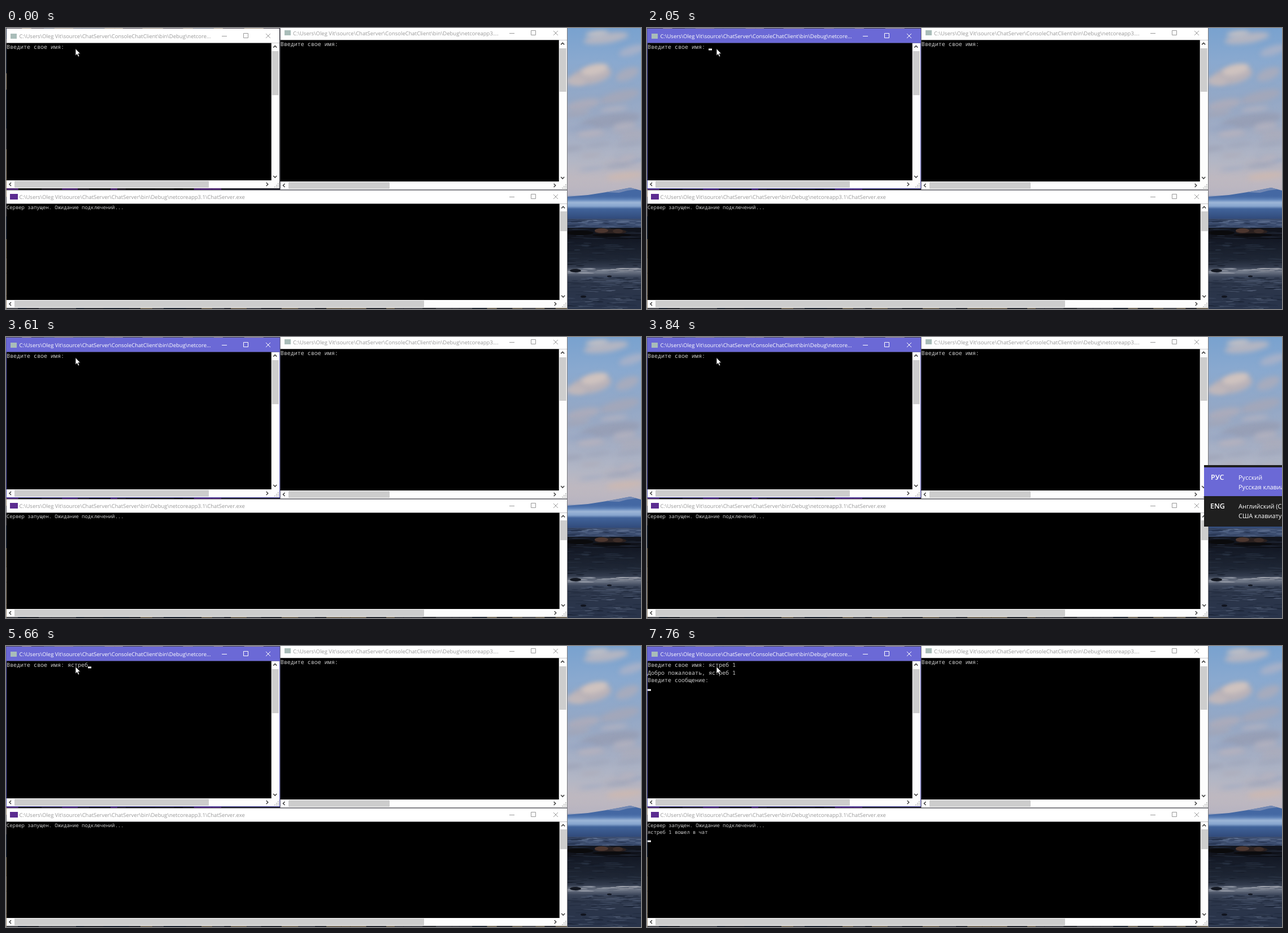
These frames come from a looping animation (1124x498 px, 8000 ms). An HTML page with a canvas:

```html
<!DOCTYPE html>
<html lang="ru">
<head>
<meta charset="utf-8">
<title>Console chat</title>
<style>
  html, body { margin: 0; width: 100%; height: 100%; overflow: hidden; background: #000; }
  canvas, svg { position: absolute; left: 0; top: 0; width: 1124px; height: 498px; }
  text { text-rendering: geometricPrecision; white-space: pre; }
  .ui { font-family: "Open Sans", "Noto Sans", sans-serif; }
  .title { font-size: 9.47px; fill: #999; }
  .mono { font: 10px "Noto Sans Mono", "DejaVu Sans Mono", monospace; fill: #ccc; }
  .small { font-size: 8.89px; }
  .line { fill: none; stroke: #999; stroke-width: 1; }
  .arrow { fill: none; stroke: #444; stroke-width: 1.6; }
  .bar { fill: #fff; }
  .frame { fill: none; stroke: none; }
  .active .bar { fill: #6b69d6; }
  .active .frame { stroke: #5a58b8; }
  .active .title { fill: #fff; }
  .active .line { stroke: #fff; }
  .lang { font-size: 11px; fill: #fff; }
  .code { font-size: 12.5px; font-weight: 600; fill: #fff; }
</style>
</head>
<body>
<canvas id="desk" width="1124" height="498"></canvas>
<svg id="stage" viewBox="0 0 1124 498"></svg>
<script>
const LOOP = 8000;
const CELL = 6;
const PROMPT = 'Введите свое имя: ';
const NAME = 'ястреб 1';
const PATH = 'C:\\Users\\Oleg Vit\\source\\ChatServer\\';

function seeded(seed) {
  return () => {
    seed = (seed * 16807) % 2147483647;
    return seed / 2147483647;
  };
}

// ---- Desktop: seaside backdrop and slivers of windows behind ----
const ctx = document.getElementById('desk').getContext('2d');
const rnd = seeded(4711);
const between = (a, b) => a + (b - a) * rnd();

function box(color, x, y, w, h) {
  ctx.fillStyle = color;
  ctx.fillRect(x, y, w, h);
}

function blob(color, x, y, rx, ry, tilt = 0) {
  ctx.fillStyle = color;
  ctx.beginPath();
  ctx.ellipse(x, y, rx, ry, tilt, 0, Math.PI * 2);
  ctx.fill();
}

function shape(color, points) {
  ctx.fillStyle = color;
  ctx.beginPath();
  points.forEach(([x, y]) => ctx.lineTo(x, y));
  ctx.fill();
}

function fade(y, h, stops) {
  const g = ctx.createLinearGradient(0, y, 0, y + h);
  stops.forEach(s => g.addColorStop(...s));
  box(g, 994, y, 130, h);
}

function ripples(count, colors, top, bottom, maxW) {
  for (let i = 0; i < count; i++) {
    const y = between(top, bottom), w = between(maxW / 4, maxW);
    blob(colors[i % colors.length], between(994, 1124), y, w, between(0.3, 0.9), between(-0.05, 0.05));
  }
}

function drawSky() {
  fade(0, 300, [[0, '#79a2cf'], [0.2, '#8aa9cf'], [0.42, '#94a8c6'], [0.62, '#a3aec5'],
                [0.78, '#b2b6c5'], [0.9, '#c0b9c0'], [1, '#b5b3c2']]);
  ctx.filter = 'blur(4px)';
  blob('#b3b5c2', 1062, 18, 40, 9, -0.15);
  blob('#c5c1c4', 1046, 10, 20, 5, -0.1);
  blob('#a5b0c8', 1108, 40, 24, 8, -0.3);
  blob('#b9b2b8', 1036, 84, 36, 15, -0.2);
  blob('#cfc3bf', 1042, 74, 24, 9, -0.25);
  blob('#bfb7ba', 1008, 94, 18, 8);
  blob('#a6abbd', 1100, 82, 22, 10, -0.4);
  blob('#a2a7ba', 1086, 122, 36, 10, -0.25);
  blob('#aaabbb', 1022, 136, 30, 9, -0.2);
  blob('#979fb6', 1070, 164, 54, 12, -0.15);
  for (let i = 0; i < 24; i++) {
    const color = ['#9ea4b8', '#adacb9', '#98a6c2', '#b6b3bf'][i % 4];
    blob(color, between(994, 1124), between(140, 250), between(12, 30), between(2, 5), -0.12);
  }
  blob('#cbb8b2', 1096, 262, 34, 6, -0.1);
  blob('#bcb7c0', 1024, 274, 40, 6);
  ctx.filter = 'none';
}

function drawShore() {
  shape('#4468a3', [[994, 299], [1030, 296], [1062, 291], [1084, 287], [1105, 283], [1124, 288], [1124, 325], [994, 325]]);
  shape('#7288b3', [[1062, 291], [1084, 287], [1105, 283], [1116, 286], [1100, 288], [1085, 292]]);
  fade(296, 44, [[0, '#4468a300'], [0.18, '#5f83b8'], [0.3, '#9db6d8'], [0.45, '#86a4cd'],
                 [0.56, '#41639a'], [1, '#2f4877']]);
  box('#3c4d6f', 994, 338, 130, 17);
  ripples(36, ['#6b7d9d', '#222f49', '#566889', '#2c3b59'], 339, 354, 24);
  box('#11141d', 994, 354, 130, 24);
  ripples(18, ['#2a3447', '#0a0d14', '#1d2533'], 354, 376, 26);
  blob('#0a0a0c', 1016, 363, 24, 4);
  blob('#2a201f', 1070, 361, 28, 5);
  blob('#4d372f', 1054, 359, 12, 4);
  blob('#3d2d28', 1083, 360, 9, 4);
  blob('#0b0b0e', 1072, 367, 34, 3);

  fade(374, 124, [[0, '#131824'], [0.3, '#1f2736'], [0.4, '#333c4e'], [0.47, '#6b7383'],
                  [0.54, '#3c465a'], [0.65, '#2c364a'], [1, '#28334a']]);
  ripples(60, ['#141a27', '#2a3445', '#1b2332'], 378, 422, 18);
  ripples(22, ['#9ea3af', '#7d8594', '#b0b2ba'], 426, 435, 22);
  ripples(110, ['#1c2537', '#3f4b62', '#232d41', '#4c5870'], 440, 498, 18);
  blob('#141821', 1008, 430, 10, 3);
  blob('#11151f', 1068, 440, 4, 1.5);
  blob('#11151f', 1022, 476, 5, 2);
}

function slivers(x, y, w, h, colors, step) {
  const across = w > h;
  const end = across ? w : h;
  for (let d = 0; d < end;) {
    const len = Math.min(between(step / 3, step), end - d);
    const color = colors[Math.floor(rnd() * colors.length)];
    across ? box(color, x + d, y, len, h) : box(color, x, y + d, w, len);
    d += len;
  }
}

box('#20202a', 0, 0, 994, 498);
drawSky();
drawShore();
slivers(0, 0, 486, 1, ['#8d8175', '#5c6170', '#9c8d7c', '#49424c'], 40);
slivers(0, 1, 1, 497, ['#8d7c64', '#55525c', '#a08f7a', '#2c3850'], 50);
slivers(1, 284, 380, 3, ['#090909', '#111', '#252028', '#4c2670', '#151515'], 26);
slivers(1, 496, 992, 2, ['#6b6253', '#24262c', '#44454b', '#1a212c'], 30);

// ---- Windows ----
const rect = (x, y, w, h, fill) => `<rect x="${x}" y="${y}" width="${w}" height="${h}" fill="${fill}"/>`;
const text = (cls, x, y, s, id = '') => `<text class="${cls}" x="${x}" y="${y}" id="${id}">${s}</text>`;

function chevron(x, y, turn) {
  return `<path class="arrow" d="M-3 1.5L0 -1.5L3 1.5" transform="translate(${x} ${y}) rotate(${turn})"/>`;
}

function grip(x, y) {
  let dots = '';
  for (let r = 0; r < 3; r++)
    for (let c = 0; c <= r; c++) dots += rect(x - c * 3, y - (2 - r) * 3, 1.6, 1.6, '#aaa');
  return dots;
}

// x, y, r, b: outer edges; top: console top; sx, sy: scrollbar origins; mid: title centre
function win({ id, x, y, r, b, top, sx, sy, mid, v, h, title, icon }) {
  const bx = r - 98, mx = r - 60, cx = r - 20;
  return `<g id="${id}">
    ${rect(x, top, r - x, b - top, '#fdfdfd')}
    <rect class="bar" x="${x}" y="${y}" width="${r - x}" height="${top - y}"/>
    ${rect(x, top, sx - x, sy - top, '#000')}
    ${rect(sx + 1, v[0], 12, v[1], '#cdcdcd')}
    ${rect(h[0], sy + 1, h[1], 12, '#cdcdcd')}
    ${chevron(sx + 6.5, top + 6.5, 0)}${chevron(sx + 6.5, sy - 6.5, 180)}
    ${chevron(x + 6.5, sy + 7, -90)}${chevron(sx - 7.5, sy + 7, 90)}
    ${grip(r - 3, sy + 11)}
    ${icon}
    ${text('ui title', x + 22.5, mid + 3.6, title)}
    <path class="line" d="M${bx - 4} ${mid + .5}h9M${mx - 3.5} ${mid - 4.5}h8v8h-8zM${cx - 4} ${mid - 4}l8 8m0-8l-8 8"/>
    <path class="frame" d="M${x - .5} ${y}V${b + .5}H${r + .5}V${y}"/>
  </g>`;
}

const clientIcon = (x, y) => rect(x, y, 11, 9, '#a9bdb9');

document.getElementById('stage').innerHTML =
  win({ id: 'left', x: 1, y: 1, r: 484, b: 284, top: 26.67, sx: 469.7, sy: 270, mid: 14,
        v: [41, 78], h: [15, 344], icon: clientIcon(8, 10),
        title: PATH + 'ConsoleChatClient\\bin\\Debug\\netcore...' }) +
  win({ id: 'right', x: 485.5, y: 0, r: 993, b: 286.5, top: 21.33, sx: 978.7, sy: 272, mid: 9,
        v: [36, 77], h: [500, 179], icon: clientIcon(493, 4),
        title: PATH + 'ConsoleChatClient\\bin\\Debug\\netcoreapp3....' }) +
  win({ id: 'server', x: 1, y: 287.5, r: 993, b: 496, top: 311.5, sx: 979.7, sy: 482, mid: 299,
        v: [325, 35], h: [15, 725], icon: rect(7, 294, 14, 10, '#5c2d91'),
        title: PATH + 'ChatServer\\bin\\Debug\\netcoreapp3.1\\ChatServer.exe' }) +
  rect(993, 0, 1, 498, '#77777c') + rect(485.5, 286.5, 507.5, 1, '#77777c') +
  text('mono', 1, 37.4, '', 'entry') +
  `<g id="welcome">
    ${text('mono', 1, 50.7, 'Добро пожаловать, ' + NAME)}
    ${text('mono', 1, 64, 'Введите сообщение:')}
  </g>` +
  text('mono', 485.7, 32, PROMPT) +
  text('mono small', 1, 321, 'Сервер запущен. Ожидание подключений...') +
  `<g id="joined">
    ${text('mono small', 1, 333, NAME + ' вошел в чат')}
    ${rect(1, 344.5, 6, 3, '#fff')}
  </g>
  <rect id="caret" width="6" height="3" fill="#fff"/>
  <path d="M123 36.5V49l2.8-2.6 2 4.6 2-.9-2-4.5h3.8z" fill="#fff" stroke="#000" stroke-width=".7"/>
  <g id="popup">
    ${rect(986, 227, 138, 109, '#1f1f1f')}${rect(986, 231, 138, 51, '#6b69d6')}
    ${text('ui code', 998, 253, 'РУС')}
    ${text('ui lang', 1047, 253, 'Русский')}
    ${text('ui lang', 1047, 269.5, 'Русская клавиатура')}
    ${text('ui code', 997, 303.5, 'ENG')}
    ${text('ui lang', 1047, 303.5, 'Английский (США)')}
    ${text('ui lang', 1047, 320.5, 'США клавиатура')}
  </g>`;

// ---- Timeline: [time, typed text, caret column or -1 when hidden] ----
const cues = [
  [0, '', -1], [990, '', 0], [1520, '', -1], [2050, '', 0],
  [2420, 'R', 0], [2490, 'R', 1], [2550, 'Rk', 2], [2620, 'Rkb', 3], [2860, 'Rk', 2],
  [3020, 'R', 1], [3110, '', 1], [3200, '', 0], [3610, '', -1], [4110, '', 0],
  ...[1, 2, 3, 4, 5, 6].map(n => [4290 + (n - 1) * 102, NAME.slice(0, n), n]),
  [5140, NAME.slice(0, 6), -1], [5660, NAME.slice(0, 6), 6],
  [5940, NAME.slice(0, 7), 7], [6000, NAME, 8], [6180, NAME, -1],
  [6650, NAME, 0], [7230, NAME, -1], [7760, NAME, 0]
];

const el = id => document.getElementById(id);
const show = (id, on) => { el(id).style.display = on ? '' : 'none'; };

function render(t) {
  const [, typed, col] = cues.findLast(c => c[0] <= t);
  const sent = t >= 6560;
  el('left').classList.toggle('active', t >= 470);
  el('entry').textContent = PROMPT + typed;
  el('caret').setAttribute('x', sent ? 1 : 109 + col * CELL);
  el('caret').setAttribute('y', sent ? 76.5 : 36.5);
  show('caret', col >= 0);
  show('welcome', sent);
  show('joined', t >= 6650);
  show('popup', t >= 3840 && t < 3870);
}

const start = performance.now();
function tick() {
  render((performance.now() - start) % LOOP);
  requestAnimationFrame(tick);
}
tick();
</script>
</body>
</html>
```
